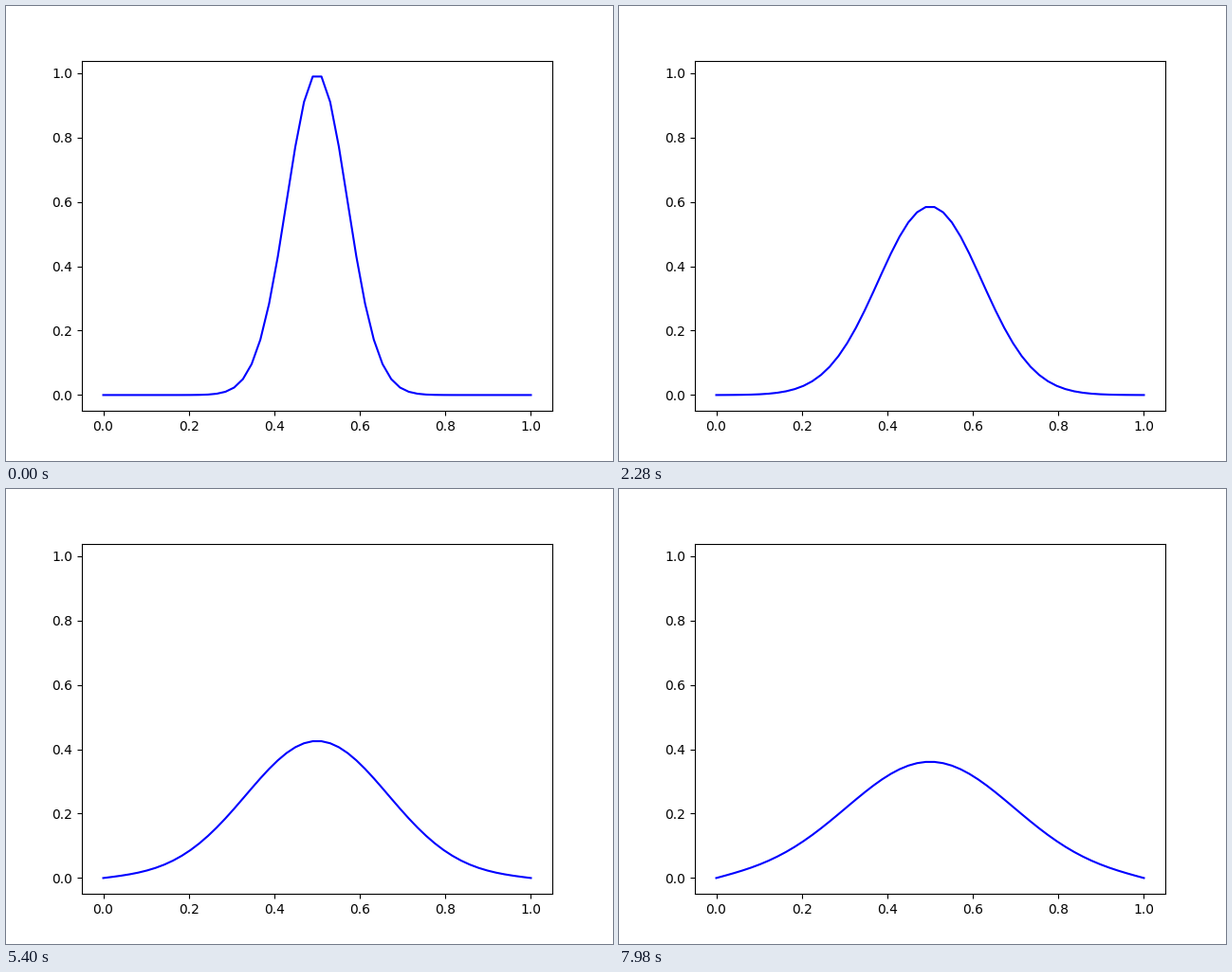
Animation of 640x480 px, one loop 8000 ms. Source, as a matplotlib script:

```python
import numpy as np
import matplotlib.pyplot as plt
from matplotlib.animation import FuncAnimation

POINTS = 50
RATE = 0.3       # diffusivity * dt / dx^2
TICK = 20        # ms
HOLD = 3         # ticks per diffusion step
TICKS = 400

x = np.linspace(0, 1, POINTS)


def diffuse(u):
    """One explicit step of the heat equation with fixed ends."""
    new = u.copy()
    new[1:-1] += RATE * (u[2:] - 2 * u[1:-1] + u[:-2])
    return new


profiles = [np.exp(-100 * (x - 0.5) ** 2)]
for _ in range((TICKS - 1) // HOLD):
    profiles.append(diffuse(profiles[-1]))

fig, ax = plt.subplots(figsize=(6.4, 4.8), dpi=100)
line, = ax.plot(x, profiles[0], "b-", lw=1.5)
ax.set_xlim(ax.get_xlim())
ax.set_ylim(ax.get_ylim())


def update(tick):
    line.set_ydata(profiles[tick // HOLD])
    return line,


anim = FuncAnimation(fig, update, frames=TICKS, interval=TICK,
                     init_func=lambda: update(0), repeat=True, repeat_delay=0)
plt.show()
```
